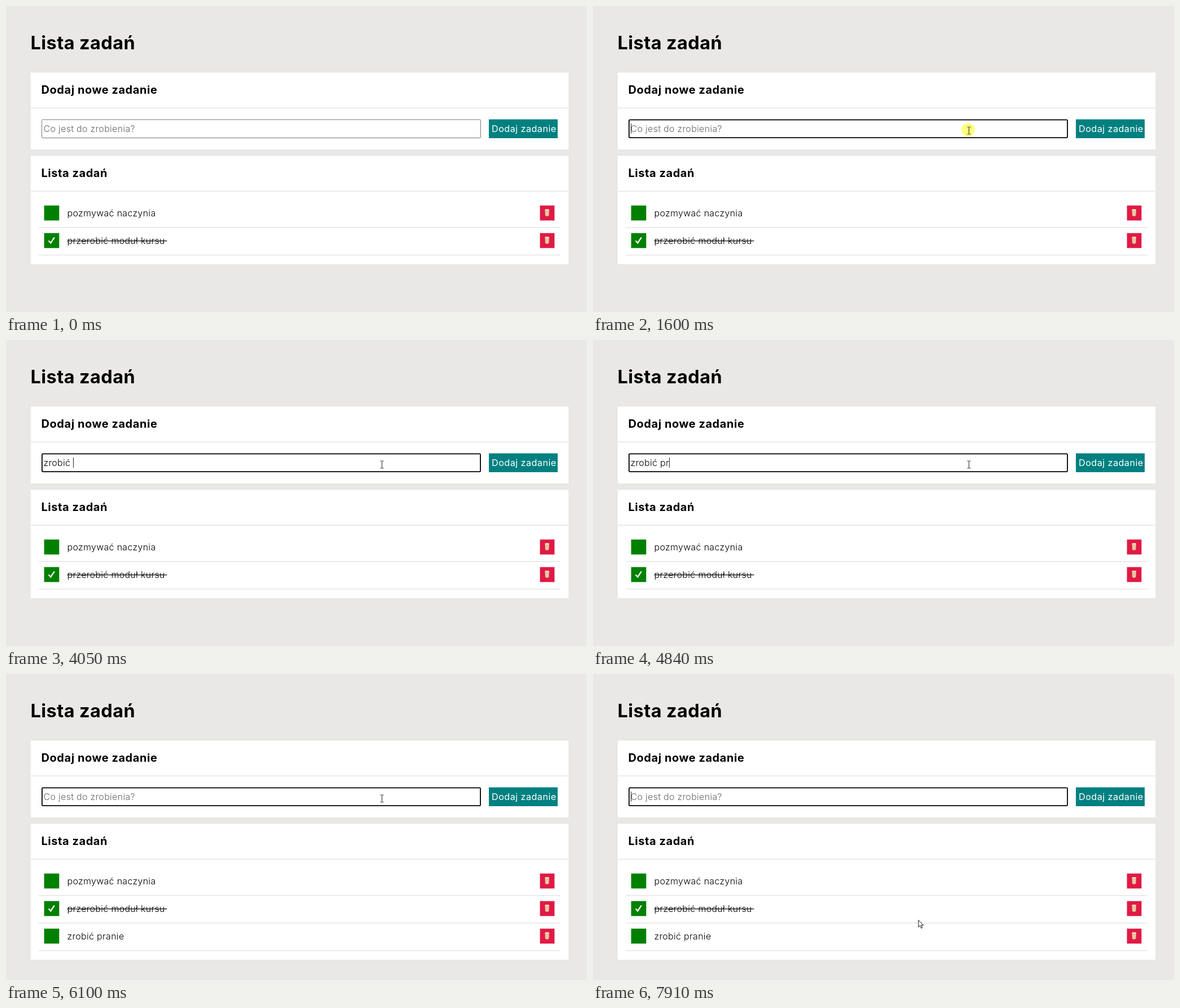
Write an HTML page that moves like this. It is 1030 by 544 pixels and loops after 8 s.

```html
<!DOCTYPE html>
<html lang="pl">
<head>
<meta charset="utf-8">
<title>Lista zadań</title>
<style>
html, body { margin: 0; width: 100%; height: 100%; overflow: hidden; background: #e9e8e6; }
svg { display: block; width: 1030px; height: 544px; }
text { font: 300 16px Inter, sans-serif; letter-spacing: .3px; white-space: pre; }
.title { font-weight: 700; font-size: 32.5px; letter-spacing: .4px; }
.head { font-weight: 700; font-size: 20px; letter-spacing: .55px; }
.button { fill: #fff; font-weight: 400; font-size: 16.3px; letter-spacing: .4px; }
.panel { fill: #fff; filter: drop-shadow(0 0 1px #dadada); }
.rule { fill: #e6e6e6; }
</style>
</head>
<body>
<svg viewBox="0 0 1030 544">
  <defs>
    <g id="row">
      <rect x="67.6" y="354.7" width="26.7" height="26.6" fill="green"/>
      <rect x="946.6" y="354.7" width="25.8" height="26.6" fill="#e01a45"/>
      <path d="M955.4 362.5 L955.9 372.8 Q959.2 375 962.5 372.8 L963 362.5Z" fill="#e0b48c"/>
      <path d="M957.3 364.5v8M959.3 365v8.3M961.2 364.5v8" stroke="#f7e2c0" stroke-width=".8"/>
      <ellipse cx="959.2" cy="362.4" rx="3.9" ry="1.4" fill="#f6dfbd"/>
      <rect class="rule" x="58" y="393" width="925" height="1.5"/>
    </g>
  </defs>
  <text class="title" x="43.6" y="76.5">Lista zadań</text>

  <rect class="panel" x="43.6" y="118.2" width="953.8" height="137"/>
  <text class="head" x="62.5" y="156">Dodaj nowe zadanie</text>
  <rect class="rule" x="44" y="180.5" width="953" height="1.5"/>
  <rect id="field" fill="#fff"/>
  <text id="entry" x="66.5" y="223.5"></text>
  <rect id="caret" y="209" width="1" height="18" fill="#222"/>
  <rect x="856" y="201.5" width="122" height="33.5" fill="teal"/>
  <text class="button" x="861" y="223.5">Dodaj zadanie</text>

  <rect class="panel" id="list" x="43.6" y="266" width="953.8"/>
  <text class="head" x="62.5" y="304">Lista zadań</text>
  <rect class="rule" x="44" y="328.5" width="953" height="1.5"/>
  <use href="#row"/>
  <text x="108.5" y="374">pozmywać naczynia</text>
  <use href="#row" y="49"/>
  <path d="M75.6 417.3 l3.6 4 6.6-10" fill="none" stroke="#fff" stroke-width="2.3"/>
  <text x="108.5" y="423">przerobić moduł kursu</text>
  <rect x="108.5" y="417" width="177" height="1.2"/>
  <g id="added">
    <use href="#row" y="98"/>
    <text x="108.5" y="472">zrobić pranie</text>
  </g>

  <circle id="glow" cx="665" cy="220" r="12" fill="#ffff80"/>
  <path id="beam" d="M-3-6.5h2.2l.8.8.8-.8h2.2M0-5.7v11.4M-3 6.5h2.2l.8-.8.8.8h2.2" fill="none" stroke="#222"/>
  <path id="arrow" d="M0 0v12.5l2.9-2.7 2 4.7 2-.9-2-4.5h3.8z" fill="#fff" stroke="#111"/>
</svg>
<script>
const $ = id => document.getElementById(id);
const LOOP = 8000, STEP = 70;
const FOCUS = 1600, SUBMIT = 6100, BLINK = 530;
const phrase = "zrobić pranie";
const keys = [2190, 2650, 2860, 3260, 3390, 3850, 4050, 4510, 4840, 5040, 5300, 5430, 5560];
// start time, steps, from, to
const moves = [
  [520, 2, [716, 437], [676.5, 230.5]],
  [1120, 3, [676.5, 230.5], [666.5, 221.5]],
  [7490, 6, [666.5, 221.5], [577, 437.5]],
];

function set(id, attrs) {
  for (const name in attrs) $(id).setAttribute(name, attrs[name]);
}
function show(id, on) {
  $(id).style.display = on ? "" : "none";
}

function pointer(t) {
  const [start, steps, from, to] = moves.findLast(m => t >= m[0]) || moves[0];
  const k = Math.min(Math.floor((t - start) / STEP), steps) / steps;
  const ease = k * k * (3 - 2 * k);
  return from.map((a, i) => a + (to[i] - a) * ease);
}

function draw(t) {
  const [x, y] = pointer(t);
  const seen = t >= 520, inside = y > 201 && y < 235;
  show("beam", seen && inside);
  show("arrow", seen && !inside);
  set("beam", { transform: `translate(${x} ${y})` });
  set("arrow", { transform: `translate(${x} ${y})` });
  show("glow", t >= FOCUS && t < 1790);

  const focused = t >= FOCUS;
  set("field", focused
    ? { x: 63.9, y: 202.4, width: 777.2, height: 31.8, rx: 1.5, stroke: "#000", "stroke-width": 1.8 }
    : { x: 63.5, y: 202, width: 778, height: 32.5, rx: 1.5, "stroke-width": 1,
        stroke: seen && inside ? "#4f4f4f" : "#767676" });

  const sent = t >= SUBMIT;
  const count = sent ? 0 : keys.filter(k => t >= k).length;
  $("entry").textContent = count ? phrase.slice(0, count) : "Co jest do zrobienia?";
  set("entry", { fill: count ? "#000" : "#666" });

  // The blink restarts with every key; it is in its dark half on submit.
  const since = sent ? t - SUBMIT + BLINK : t - (count ? keys[count - 1] : FOCUS);
  show("caret", focused && Math.floor((since + 10) / BLINK) % 2 === 0);
  set("caret", { x: count ? Math.round(66 + $("entry").getComputedTextLength()) : 67 });

  show("added", sent);
  set("list", { height: sent ? 242.2 : 193.2 });
}

function tick(now) {
  draw(now % LOOP);
  requestAnimationFrame(tick);
}
requestAnimationFrame(tick);
</script>
</body>
</html>
```
